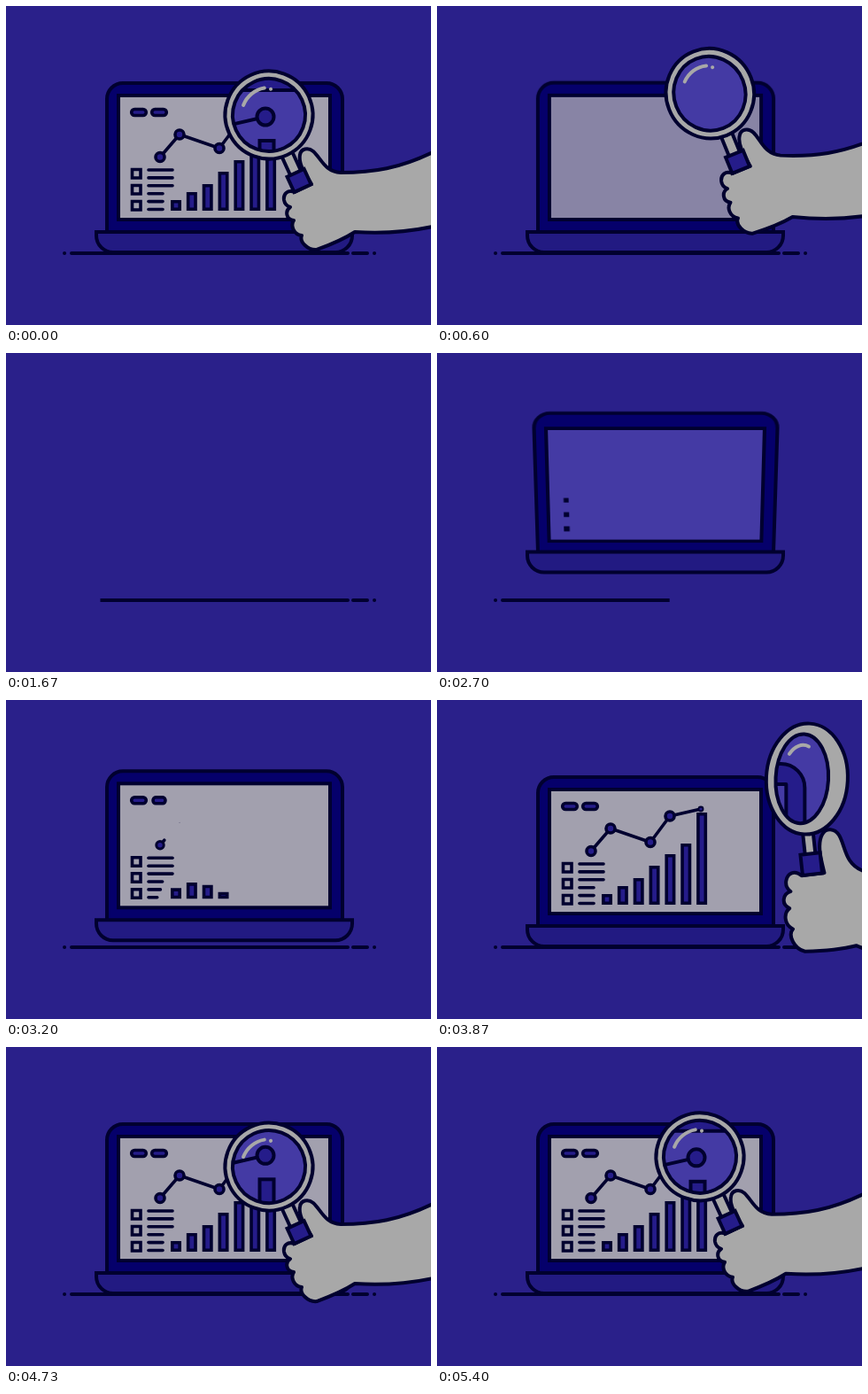
These frames come from a looping animation (480x360 px, 5430 ms). An HTML page:

```html
<!DOCTYPE html>
<html lang="en">
<head>
<meta charset="utf-8">
<title>Chart under a magnifier</title>
<style>
  html, body { margin: 0; width: 100%; height: 100%; overflow: hidden; background: #2a208a; }
  #laptop, svg { position: absolute; left: 0; top: 0; width: 480px; height: 360px; overflow: hidden; }
  svg { fill: none; stroke: #00002f; stroke-width: 4; stroke-linecap: round; stroke-linejoin: round; }
  #lid { transform-origin: 246.5px 256px; }
  #base { transform-origin: 246.5px 281px; }
  #chart { stroke-width: 3.6; }
  #chart *, #zoom * { transform-box: fill-box; }
  .blue { fill: #251c8a; }
  .grey { fill: #a8a8a8; }
  .shine { stroke: #a8a8a8; }
  .arm *, #chart rect { vector-effect: non-scaling-stroke; }
</style>
</head>
<body>
<svg>
  <clipPath id="span"><rect id="spanBox" y="270" height="20"/></clipPath>
  <path clip-path="url(#span)" d="M66 279h.1M74 279H386M392 279H408M416 279h.1"/>
</svg>
<div id="laptop">
  <svg id="lid">
    <path id="shell" fill="#05006b"/>
    <rect id="screen" x="127" y="101" width="239" height="140" stroke-linejoin="miter"/>
    <g id="chart"></g>
  </svg>
  <svg id="base"><path fill="#221a82" stroke-linejoin="miter" d="M102 255H391V259A19 19 0 0 1 372 278H121A19 19 0 0 1 102 259Z"/></svg>
</div>
<svg>
  <clipPath id="lens"><ellipse id="lensShape" ry="41"/></clipPath>
  <g class="arm"><g class="ring">
    <rect id="stem" class="grey" y="44" height="32"/>
    <ellipse id="rim" class="grey"/>
  </g></g>
  <g clip-path="url(#lens)">
    <rect width="480" height="360" fill="#443aa4" stroke="none"/>
    <g id="zoom">
      <path id="corner" class="blue" fill-rule="evenodd" d="M150 72H378A27 27 0 0 1 405 99V240H150ZM170 95H384V220H170Z"/>
    </g>
  </g>
  <g class="arm">
    <g class="ring">
      <ellipse id="inner" ry="41"/>
      <g id="gloss" class="shine"><path d="M-21.7-22.1A31 31 0 0 1 8-29.8"/><path id="spark" d="M14-25.7h.1"/></g>
    </g>
    <path class="grey" d="M326 210C318 207 313 212 314 219Q315 225 321 227C315 231 316 241 325 242C321 248 325 258 334 259C331 266 341 276 351 275C362 271 380 264 394 255Q440 258 482 249L760 170V40L482 165C445 183 415 188 378 188C360 187 356 172 347 164C341 159 333 161 332 168C330 178 338 190 345 201Z"/>
    <g class="ring"><rect id="grip" class="blue" y="72" height="19" stroke-linejoin="miter"/></g>
  </g>
</svg>
<script>
const LOOP = 5430;
const $ = id => document.getElementById(id);
const clamp = x => Math.min(1, Math.max(0, x));
const part = (t, a, b) => clamp((t - a) / (b - a));
const ease = p => (1 - Math.cos(Math.PI * p)) / 2;
const smooth = (t, a, b) => ease(part(t, a, b));
const mix = (a, b, p) => a + (b - a) * p;
const blend = (a, b, p) => `rgb(${a.map((v, i) => mix(v, b[i], p))})`;
const set = (el, attrs) => { for (const k in attrs) el.setAttribute(k, attrs[k]); };

// Parts that grow in from time `start` and shrink away from time `end`.
const parts = [];
function add(parent, tag, attrs, kind, start, end, { origin = 'center', span = 300 } = {}) {
  const el = document.createElementNS('http://www.w3.org/2000/svg', tag);
  set(el, attrs);
  el.style.transformOrigin = origin;
  parent.append(el);
  parts.push({ el, kind, start, end, span });
}
const chart = $('chart'), zoom = $('zoom');

[141.7, 164.7].forEach((x, i) => add(chart, 'rect',
  { x, y: 116.5, width: 16.6, height: 7, rx: 3.5, class: 'blue' }, 'scaleX', 2900 + i * 80, 60 + i * 50));
for (let i = 0; i < 3; i++) add(chart, 'rect',
  { x: 142.5, y: 184.5 + i * 18, width: 9.5, height: 9.5, 'stroke-linejoin': 'miter' }, 'scale', 2610 - i * 10, 120 + i * 40);
[27, 27, 27, 16, 16, 16].forEach((w, i) => add(chart, 'path',
  { d: `M161 ${185 + i * 8.9}h${w}` }, 'dash', 2780 + i * 50, 90 + i * 40));
[219, 210, 201, 187, 174, 162, 127].forEach((top, i) => add(chart, 'rect',
  { x: 187.8 + i * 17.85, y: top + 1.8, width: 8.4, height: 227.4 - top, class: 'blue', 'stroke-linejoin': 'miter' },
  'scaleY', 2900 + i * 80, 80 + i * 30, { origin: 'bottom' }));
const points = [[174, 170.5], [196, 145], [241, 160.5], [263, 131], [298, 123]];
add(chart, 'path', { d: 'M' + points.join('L') }, 'dash', 3100, 150, { span: 720 });
points.forEach(([cx, cy], i) => add(chart, 'circle',
  { cx, cy, r: 5, class: 'blue' }, 'scale', 2980 + i * 185, 150 + i * 40));

add(zoom, 'rect', { x: 286.5, y: 152, width: 16, height: 80, class: 'blue', 'stroke-linejoin': 'miter' },
  'scaleY', 3380, 260, { origin: 'bottom' });
add(zoom, 'path', { d: 'M245 136L293 125' }, 'dash', 3100, 150);
add(zoom, 'circle', { cx: 293, cy: 125, r: 9.5, class: 'blue' }, 'scale', 3720, 310);

function showParts(t) {
  for (const { el, kind, start, end, span } of parts) {
    const p = t > 2000 ? smooth(t, start, start + span) : 1 - smooth(t, end, end + 260);
    el.style.visibility = p < .01 ? 'hidden' : 'visible';
    if (kind === 'dash') set(el, p < 1
      ? { pathLength: 1, 'stroke-dasharray': '1 2', 'stroke-dashoffset': 1 - p }
      : { pathLength: 1, 'stroke-dasharray': 'none' });
    else el.style.transform = p < 1 ? `${kind}(${p})` : 'none';
  }
}

function showLaptop(t) {
  const opening = t > 2000;
  const angle = opening ? 90 * (1 - smooth(t, 2420, 2875)) : 90 * part(t, 425, 1228) ** 3;
  const hop = -41 * (t < 2870 ? smooth(t, 2410, 2850) : 1 - part(t, 2890, 3230) ** 2);
  const height = opening ? smooth(t, 2290, 2430) : 1 - smooth(t, 1250, 1560);
  $('laptop').style.transform = opening && hop ? `translateY(${hop}px)` : 'none';

  // The top edge of the lid shows its thickness as it tilts forward.
  const top = 87 - 9 * Math.sin(angle * Math.PI / 180);
  set($('shell'), { d: `M114 257V${top + 18}A18 18 0 0 1 132 ${top}H362A18 18 0 0 1 380 ${top + 18}V257Z` });
  $('lid').style.visibility = angle > 89 ? 'hidden' : 'visible';
  $('lid').style.transform = angle > .01 ? `perspective(2300px) rotateX(${-angle}deg)` : 'none';
  $('base').style.visibility = height < .01 ? 'hidden' : 'visible';
  $('base').style.transform = height < 1 ? `scaleY(${height})` : 'none';

  const lit = [162, 160, 174];
  $('screen').style.fill = opening ? blend([68, 58, 164], lit, smooth(t, 2750, 3200))
                                   : blend(lit, [36, 28, 132], smooth(t, 450, 950));
  const left = opening ? 62 : 62 + 358 * part(t, 1500, 1985) ** 2;
  const right = opening ? 62 + 358 * smooth(t, 2060, 3250) : 420;
  set($('spanBox'), { x: left, width: Math.max(0, right - left) });
}

// time, grip x, grip y, turn, size, lens width ratio
const poses = [
  [3400, 600, 192, 21, 1.45, .45],
  [3870, 423, 185, 18.5, 1.23, .59],
  [4000, 392, 189, 14, 1.14, .7],
  [4350, 334, 200, 2, 1.01, .97],
  [4570, 331, 204, 0, 1, 1],
  [4820, 331, 210.5, 0, 1, 1],
  [5430, 331, 197, 0, 1, 1],
  [6000, 338, 178, 2, 1.02, .97],
  [6460, 467, 97, 22, 1.42, .43],
  [6600, 575, 60, 25, 1.5, .4]
];
const slope = (i, c) => (poses[i + 1][c] - poses[i][c]) / (poses[i + 1][0] - poses[i][0]);
function tangent(i, c) {
  if (i === 0) return slope(0, c);
  if (i === poses.length - 1) return slope(i - 1, c);
  const a = slope(i - 1, c), b = slope(i, c);
  return a * b > 0 ? 2 * a * b / (a + b) : 0;
}
function poseAt(t) {
  t = Math.min(poses.at(-1)[0], Math.max(poses[0][0], t));
  let i = 0;
  while (i < poses.length - 2 && t > poses[i + 1][0]) i++;
  const h = poses[i + 1][0] - poses[i][0], s = (t - poses[i][0]) / h, q = 1 - s;
  return [1, 2, 3, 4, 5].map(c =>
    poses[i][c] * (1 + 2 * s) * q * q + poses[i + 1][c] * (3 - 2 * s) * s * s +
    h * s * q * (tangent(i, c) * q - tangent(i + 1, c) * s));
}

const RING = 'translate(297 123) rotate(-24.7)';
document.querySelectorAll('.ring').forEach(g => set(g, { transform: RING }));

function showHand(t) {
  const [x, y, turn, size, flat] = poseAt(t < 2000 ? t + LOOP : t);
  const move = `translate(${x} ${y}) rotate(${turn}) scale(${size}) translate(-331 -197)`;
  document.querySelectorAll('.arm').forEach(g => set(g, { transform: move }));
  const depth = (1 - flat) / .45;
  const lean = `translate(0 ${3 * depth}) rotate(${10 * depth})`;
  const stem = 6.5 * flat + depth, grip = 10.5 - 1.6 * depth;
  set($('rim'), { cx: 5 * depth, rx: 49.5 * flat + 9 * depth, ry: 49.5 + 1.5 * depth, transform: lean });
  set($('stem'), { x: -stem, width: 2 * stem });
  set($('grip'), { x: -grip, width: 2 * grip });
  set($('inner'), { rx: 41 * flat, transform: lean });
  set($('lensShape'), { rx: 41 * flat, transform: `${move} ${RING} ${lean}` });
  set($('gloss'), { transform: `${lean} scale(${flat} 1)` });
  set($('spark'), { opacity: smooth(flat, .7, .9) });

  const a = turn * Math.PI / 180;
  const cx = x + size * (74 * Math.sin(a) - 34 * Math.cos(a));
  const cy = y - size * (34 * Math.sin(a) + 74 * Math.cos(a));
  set(zoom, { transform: `translate(${(cx - 297) * .09} ${-Math.max(0, cy - 123) * .22})` });
  set($('corner'), { opacity: t < 2000 ? 1 - smooth(t, 300, 560) : 1 });
}

function frame() {
  const t = performance.now() % LOOP;
  showParts(t);
  showLaptop(t);
  showHand(t);
  requestAnimationFrame(frame);
}
frame();
</script>
</body>
</html>
```
